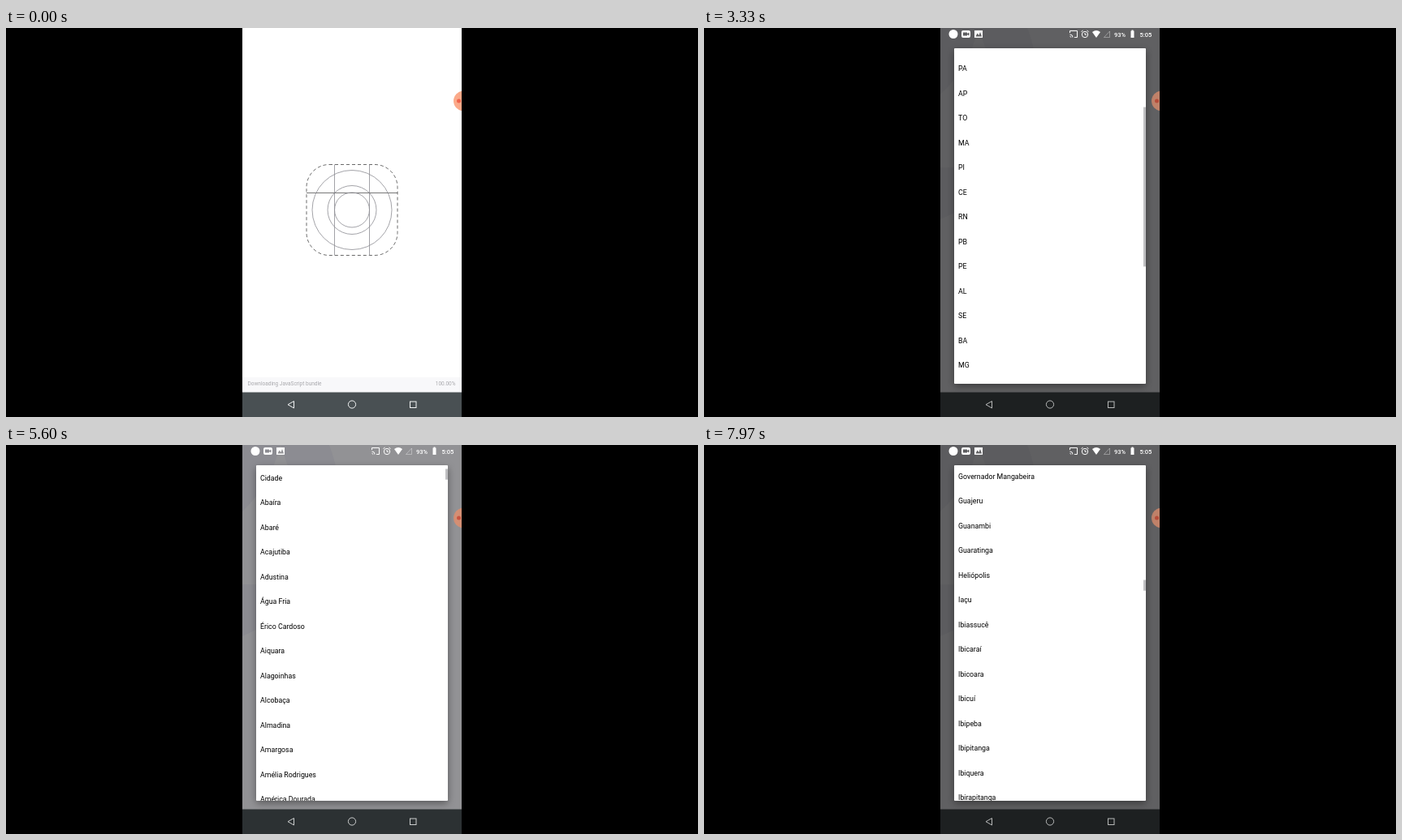
An HTML page for the animation above (8000 ms loop, 852x480 px).

```html
<!DOCTYPE html>
<html lang="pt-BR">
<head>
<meta charset="utf-8">
<title>App demo</title>
<style>
  html, body { margin: 0; width: 100%; height: 100%; overflow: hidden; background: #000; }
  svg { display: block; width: 852px; height: 480px; }
  text { font-family: Roboto, sans-serif; font-size: 8.8px; white-space: pre; }
  .head { font-family: "Noto Sans", "Open Sans", sans-serif; font-weight: 700; font-size: 16.6px; fill: #322153; }
  .name { font-size: 19.8px; }
  .small { font-size: 6.5px; fill: #a8a8ac; }
  .status { font-size: 7.5px; font-weight: 500; }
  .hint { fill: #cacad2; }
  .line { fill: none; stroke: #f2f4f4; }
</style>
</head>
<body>
<svg viewBox="0 0 852 480">
  <defs>
    <clipPath id="phone"><rect x="291" width="270" height="480"/></clipPath>
    <clipPath id="sheet"><rect x="308" y="25" width="236" height="414"/></clipPath>
    <filter id="shade" x="-10%" y="-10%" width="120%" height="120%">
      <feDropShadow dx="0" dy="3" stdDeviation="5" flood-opacity=".4"/>
    </filter>
  </defs>
  <rect width="852" height="480"/>
  <g clip-path="url(#phone)">
    <g id="home">
      <rect x="291" width="270" height="450" fill="#f0f0f5"/>
      <g fill="#e6e6ef">
        <path d="M291 0H338Q325 50 291 82Z"/>
        <path d="M338 0H398Q412 35 408 73Q368 66 350 35Z"/>
        <path d="M378 84Q432 76 454 108Q472 140 455 180Q445 212 428 224Q404 190 412 160Q386 120 378 84Z"/>
        <path d="M291 172H321Q341 202 321 222L291 236Z"/>
      </g>
      <circle cx="327" cy="90" r="15" fill="#2fb86e"/>
      <text class="head name" x="356" y="97">Verdila</text>
      <text class="head" x="311" y="161">Seu marketplace</text>
      <text class="head" x="311" y="180.5">para coleta de</text>
      <text class="head" x="311" y="200">resíduos</text>
      <g fill="#6c6c80">
        <text x="311" y="224.5">Ajudamos pessoas a encontrarem pontos</text>
        <text x="311" y="237.7">de coleta de forma eficiente.</text>
      </g>
      <g fill="none" stroke="#85828f">
        <rect x="311.5" y="299.5" width="229" height="38.5" rx="6"/>
        <rect x="311.5" y="344.5" width="229" height="38" rx="6"/>
      </g>
      <text id="state" class="hint" x="324" y="322">Estado - UF</text>
      <text class="hint" x="324" y="367">Cidade</text>
      <rect x="311" y="391" width="229.5" height="38.5" rx="6.5" fill="#34cb79"/>
      <path d="M317.5 391H350V429.5H317.5a6.5 6.5 0 0 1-6.5-6.5V397.5a6.5 6.5 0 0 1 6.5-6.5Z" fill="#2fb76d"/>
      <path class="line" d="M326.5 410.5H335M331.5 406.5L335.5 410.5L331.5 414.5"/>
      <text x="445" y="413.6" text-anchor="middle" font-weight="500" fill="#fff">Entrar</text>
    </g>
    <g id="splash">
      <rect x="291" width="270" height="450" fill="#fff"/>
      <g fill="none" stroke="#8c8c92" stroke-width=".8">
        <rect x="370" y="168.5" width="112" height="112" rx="28" stroke="#444" stroke-dasharray="4 3"/>
        <path d="M404.5 168.5V280.5M447.5 168.5V280.5"/>
        <path d="M370 203.5H482" stroke="#555"/>
        <circle cx="426" cy="224.5" r="49"/>
        <circle cx="426" cy="224.5" r="30"/>
        <circle cx="426" cy="224.5" r="21.5"/>
      </g>
      <g id="bundle">
        <rect x="291" y="431" width="270" height="19" fill="#f8f8fa"/>
        <text class="small" x="297.5" y="441">Downloading JavaScript bundle</text>
        <text class="small" x="553.5" y="441" text-anchor="end">100.00%</text>
      </g>
    </g>
    <rect x="291" y="449.5" width="270" height="31" fill="#495053"/>
    <rect id="dim" x="291" width="270" height="480"/>
    <g id="bright">
      <circle cx="563.5" cy="90" r="12.5" fill="#fbaa8a"/>
      <circle cx="557.5" cy="90" r="2.5" fill="#f0644c"/>
      <g class="line">
        <path d="M354.5 460.5V469L347 464.7Z"/>
        <circle cx="426" cy="464.5" r="4.6"/>
        <rect x="497.5" y="461" width="7.5" height="7.5"/>
      </g>
    </g>
    <g fill="#fff">
      <circle cx="307" cy="7.5" r="5.5"/>
      <path fill-rule="evenodd" d="M319 3h7q2 0 2 2v5q0 2-2 2h-7q-2 0-2-2V5q0-2 2-2ZM319 5.5v4h5v-1.5l2.5 1.5v-4L324 7V5.5Z"/>
      <path fill-rule="evenodd" d="M333 3h10v9h-10ZM334.5 10.5l2-4 2 2.5 1.5-4 2 5.5Z"/>
      <path d="M478 5Q483 1 488 5L483 12Z"/>
      <path d="M525.5 3.5h1v-1h2v1h1V12h-4Z"/>
      <g fill="none" stroke="#fff">
        <path d="M450.5 6V3.5H459.5V11.5H456M450.5 8q3.5 0 3.5 3.5M450.5 10.3q1.3 0 1.3 1.3"/>
        <circle cx="469" cy="8" r="3.7"/>
        <path d="M469 6V8.2H471M464.5 4.5L466.5 3M473.5 4.5L471.5 3"/>
        <path d="M492.5 11.5L499.5 4V11.5Z" stroke-opacity=".35"/>
      </g>
      <text class="status" x="505" y="10.6">93%</text>
      <text class="status" x="536.5" y="10.6">5:05</text>
    </g>
    <g id="dialog">
      <rect x="308" y="25" width="236" height="414" rx="1" fill="#fff" filter="url(#shade)"/>
      <g clip-path="url(#sheet)">
        <g id="states"></g>
        <g id="cities"></g>
        <rect id="thumb" x="541" width="3" fill="#bebec0"/>
      </g>
    </g>
  </g>
</svg>
<script>
const LOOP = 8000, ROW = 30.5, VIEW = 414, TRACK = 406;
const $ = id => document.getElementById(id);

const stateNames = ('Estado - UF,RO,AC,AM,RR,PA,AP,TO,MA,PI,CE,RN,PB,PE,AL,SE,BA,' +
  'MG,ES,RJ,SP,PR,SC,RS,MS,MT,GO,DF').split(',');
const cityNames = `Cidade,Abaíra,Abaré,Acajutiba,Adustina,Água Fria,Érico Cardoso,Aiquara,Alagoinhas,Alcobaça,Almadina,Amargosa,Amélia Rodrigues,América Dourada,Anagé,Andaraí,Andorinha,Angical,Anguera,Antas,Antônio Cardoso,Antônio Gonçalves,Aporá,Apuarema,Aracatu,Araças,Araci,Aramari,Arataca,Aratuípe,Aurelino Leal,Baianópolis,Baixa Grande,Banzaê,Barra,Barra da Estiva,Barra do Choça,Barra do Mendes,Barra do Rocha,Barreiras,Barro Alto,Barrocas,Barro Preto,Belmonte,Belo Campo,Biritinga,Boa Nova,Boa Vista do Tupim,Bom Jesus da Lapa,Bom Jesus da Serra,Boninal,Bonito,Boquira,Botuporã,Brejões,Brejolândia,Brotas de Macaúbas,Brumado,Buerarema,Buritirama,Caatiba,Cabaceiras do Paraguaçu,Cachoeira,Caculé,Caém,Caetanos,Caetité,Cafarnaum,Cairu,Caldeirão Grande,Camacan,Camaçari,Camamu,Campo Alegre de Lourdes,Campo Formoso,Canápolis,Canarana,Canavieiras,Candeal,Candeias,Candiba,Cândido Sales,Cansanção,Canudos,Capela do Alto Alegre,Capim Grosso,Caraíbas,Caravelas,Cardeal da Silva,Carinhanha,Casa Nova,Castro Alves,Catolândia,Catu,Caturama,Central,Chorrochó,Cícero Dantas,Cipó,Coaraci,Cocos,Conceição da Feira,Conceição do Almeida,Conceição do Coité,Conceição do Jacuípe,Conde,Condeúba,Contendas do Sincorá,Coração de Maria,Cordeiros,Coribe,Coronel João Sá,Correntina,Cotegipe,Cravolândia,Crisópolis,Cristópolis,Cruz das Almas,Curaçá,Dário Meira,Dias d'Ávila,Dom Basílio,Dom Macedo Costa,Elísio Medrado,Encruzilhada,Entre Rios,Esplanada,Euclides da Cunha,Eunápolis,Fátima,Feira da Mata,Feira de Santana,Filadélfia,Firmino Alves,Floresta Azul,Formosa do Rio Preto,Gandu,Gavião,Gentio do Ouro,Glória,Gongogi,Governador Mangabeira,Guajeru,Guanambi,Guaratinga,Heliópolis,Iaçu,Ibiassucê,Ibicaraí,Ibicoara,Ibicuí,Ibipeba,Ibipitanga,Ibiquera,Ibirapitanga,Ibirapuã,Ibirataia`.split(',');

// Total rows: the city list goes on far below the part that is reached.
const lists = {
  states: { names: stateNames, rows: 28, scroll: [[3000, 0], [3120, 40], [3330, 143], [3550, 188], [3800, 200]] },
  cities: { names: cityNames, rows: 418, scroll: [[5970, 0], [6100, 130], [7070, 2311], [7970, 4302.5]] }
};
const dimKeys = [[2010, 0], [2250, .6], [4630, .6], [5130, 0], [5490, 0], [5660, .6]];
const dialogKeys = [[2060, 0], [2200, 1], [4630, 1], [4830, 0], [5510, 0], [5590, 1]];
const thumbKeys = [[4000, 1], [4400, 0], [5400, 0], [5401, 1]];

function at(t, keys) {
  const i = keys.findIndex(k => k[0] > t);
  if (i === 0) return keys[0][1];
  if (i < 0) return keys[keys.length - 1][1];
  const [t0, a] = keys[i - 1], [t1, b] = keys[i];
  return a + (b - a) * (t - t0) / (t1 - t0);
}

for (const id in lists) {
  lists[id].names.forEach((name, i) => {
    const text = document.createElementNS('http://www.w3.org/2000/svg', 'text');
    text.setAttribute('x', 313);
    text.setAttribute('y', 43.9 + i * ROW);
    text.textContent = name;
    $(id).append(text);
  });
}

function draw(t) {
  $('bundle').setAttribute('opacity', at(t, [[20, 1], [160, 0]]));
  $('splash').setAttribute('opacity', at(t, [[200, 1], [640, 0]]));

  const dim = at(t, dimKeys);
  $('dim').setAttribute('opacity', dim);
  $('bright').style.filter = `brightness(${1 - dim * .4})`;
  $('dialog').setAttribute('opacity', at(t, dialogKeys));

  const picked = t >= 5330;
  $('state').textContent = picked ? 'BA' : 'Estado - UF';
  $('state').style.fill = picked ? '#222' : '';

  const open = t < 5200 ? 'states' : 'cities';
  for (const id in lists) $(id).style.display = id === open ? '' : 'none';
  const { rows, scroll } = lists[open], y = at(t, scroll), total = rows * ROW;
  $(open).setAttribute('transform', `translate(0 ${-y})`);
  $('thumb').setAttribute('y', 29.5 + y * TRACK / total);
  $('thumb').setAttribute('height', TRACK * VIEW / total);
  $('thumb').setAttribute('opacity', at(t, thumbKeys));
}

const start = performance.now();
(function tick() {
  draw((performance.now() - start) % LOOP);
  requestAnimationFrame(tick);
})();
</script>
</body>
</html>
```
